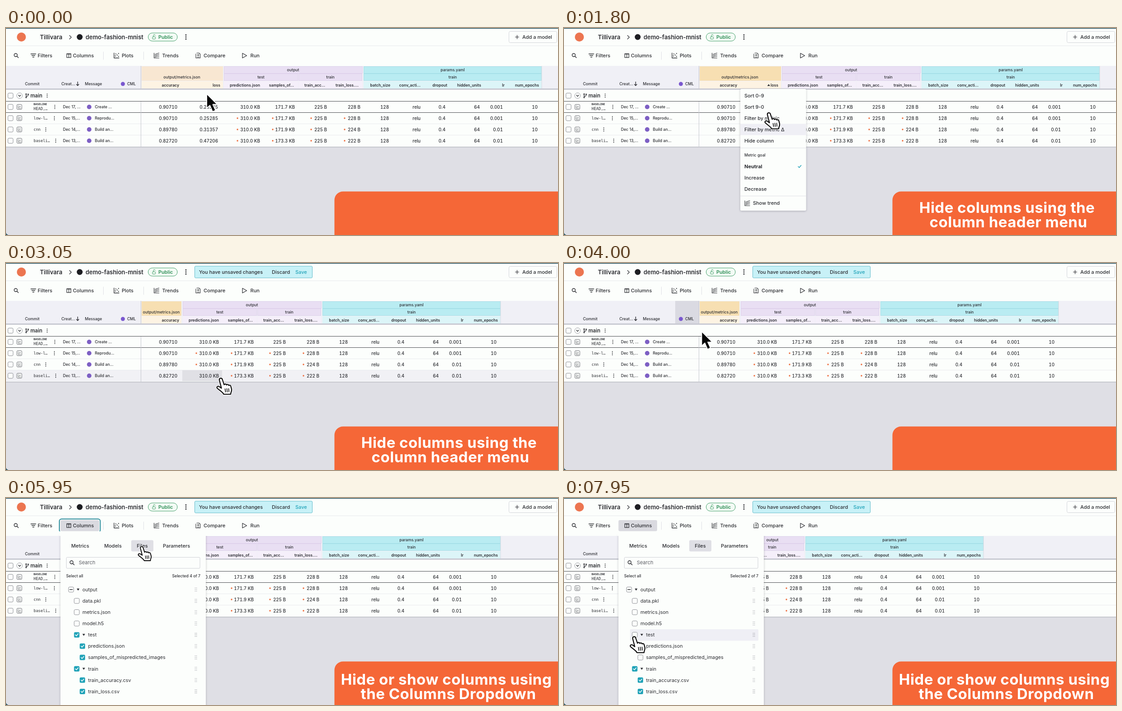
An HTML page that plays this animation: 1221 by 459 pixels, repeating every 8000 ms.

```html
<!DOCTYPE html>
<html lang="en">
<head>
<meta charset="utf-8">
<title>Hiding table columns</title>
<style>
html, body { margin: 0; width: 100%; height: 100%; overflow: hidden; background: #2b5563; }
svg { display: block; width: 100vw; height: 100vh; }
text { font-family: Inter, "Open Sans", sans-serif; white-space: pre; }
.mono { font-family: "DejaVu Sans Mono", monospace; }
.num { font-variant-numeric: tabular-nums; }
</style>
</head>
<body>
<svg id="stage" viewBox="0 0 1221 459" xmlns="http://www.w3.org/2000/svg"></svg>
<script>
const LOOP = 8000;
const INK = '#2b2c31', TEAL = '#22a3b8', WHITE = '#fcfefc', GREY = '#dfdfe5';

// ---- drawing helpers ----
const rect = (x, y, w, h, fill, extra = '') =>
  `<rect x="${x}" y="${y}" width="${w}" height="${h}" fill="${fill}" ${extra}/>`;
const circle = (x, y, r, fill, extra = '') =>
  `<circle cx="${x}" cy="${y}" r="${r}" fill="${fill}" ${extra}/>`;
const line = (d, color = INK, width = 1.2) =>
  `<path d="${d}" fill="none" stroke="${color}" stroke-width="${width}" stroke-linecap="round" stroke-linejoin="round"/>`;
const text = (x, cy, s, size = 11, o = {}) =>
  `<text x="${x}" y="${cy + size * 0.36}" font-size="${size}" font-weight="${o.w || 500}"
    text-anchor="${o.a || 'start'}" fill="${o.c || INK}" class="${o.k || ''}" ${o.x || ''}>${s}</text>`;
const group = (id, body) => `<g id="${id}">${body}</g>`;
const kebab = (x, y, r = 1, gap = 3.5) => [-gap, 0, gap].map(d => circle(x, y + d, r, INK)).join('');
const box = (x, y) =>
  rect(x - 5.7, y - 5.7, 11.4, 11.4, WHITE, 'rx="2.5" stroke="#8d8e95" stroke-width="1"');
const tick = (x, y) => rect(x - 6, y - 6, 12, 12, TEAL, 'rx="2.5"') +
  line(`M${x - 3} ${y}l2.2 2.3 4-4.6`, '#fff', 1.5);
const minus = (x, y) => box(x, y) + line(`M${x - 3} ${y}h6`, INK, 1.4);
const caret = (x, y) => `<path d="M${x - 3} ${y - 2.2}h6l-3 4.6z" fill="${INK}"/>`;
const lens = (x, y) => circle(x - 1, y - 1, 3.5, 'none', `stroke="${INK}" stroke-width="1.4"`) +
  line(`M${x + 1.8} ${y + 1.8}l3 3`, INK, 1.5);
const waves = (x, y) => line(`M${x} ${y - 5.5}v11h11M${x + 2} ${y - 2}l4-2 5-1.5M${x + 2} ${y + 1}l4-2 5-1M${x + 2} ${y + 3.5}l4-1.5 5-.5`, INK, 1.1);

// ---- top bar and toolbar ----
function topBar() {
  return circle(34, 20, 10, '#ec7550') +
    text(75, 20, 'Tillivara', 13, { w: 600 }) +
    line('M140.5 16.5l4 4-4 4') + circle(163, 20, 6.5, '#1d1e22') +
    text(176, 20, 'demo-fashion-mnist', 12.9, { w: 600 }) +
    rect(314.5, 11, 64.5, 18, '#f3fbf5', 'rx="9" stroke="#3f9d66"') +
    rect(324, 19.5, 6.5, 5, 'none', 'rx="1" stroke="#3f9d66"') +
    line('M326 19v-2a2 2 0 0 1 4-.5', '#3f9d66', 1) +
    text(337, 20, 'Public', 10.8, { w: 600, c: '#33915a' }) +
    kebab(398, 20, 1.4, 4.5) +
    rect(1112.5, 7.5, 106, 25, WHITE, 'rx="3" stroke="#d3d4da"') +
    line('M1126.5 20h8M1130.5 16v8') + text(1142, 20, 'Add a model') +
    `<path d="M0 39.5H1221" stroke="#e8e9ed"/>` +
    lens(22.5, 61) + line('M55 57.5h11M57 61h7M59 64.5h3', INK, 1.4) + text(70, 61, 'Filters');
}
function toolbar() {
  return rect(134.5, 57, 9, 8.5, 'none', `stroke="${INK}" stroke-width="1.2"`) + line('M139 57v8.5M135 58h8') +
    text(148, 61, 'Columns') +
    line('M215.5 53v17M304.5 53v17', '#dedfe5', 1) +
    line('M239 55.5v11h11', INK, 1.3) +
    [[242, 62], [243, 57.5], [246, 60], [249, 56.5], [249, 63]].map(p => circle(...p, 1.1, INK)).join('') +
    text(256, 61, 'Plots') + waves(327.5, 61) + text(345.5, 61, 'Trends') +
    line('M422 55.5h5l2.5 2.5v8.5h-9.5v-9M425 58v4M423 60h4M423 64.5h4', INK, 1.1) + text(437, 61, 'Compare') +
    line('M523 56v10.5l9.5-5.2z') + text(540.5, 61, 'Run');
}

// ---- table ----
const rowY = i => 175 + 25 * i;
// label, header right edge, value right edge, values, dot x
const COLS = {
  acc: [['accuracy', 383, 379, ['0.90710', '0.90710', '0.89780', '0.82720']]],
  loss: [['loss', 474, 469, ['0.25285', '0.25285', '0.31357', '0.47206']]],
  test: [['predictions.json', 562, 562, Array(4).fill('310.0 KB'), 512],
    ['samples_of...', 637, 639, ['171.7 KB', '171.7 KB', '171.9 KB', '173.3 KB'], 590]],
  train: [['train_acc...', 706, 710, Array(4).fill('225 B'), 675],
    ['train_loss....', 780, 784, ['228 B', '228 B', '224 B', '222 B'], 749]],
  params: [['batch_size', 850, 847, Array(4).fill('128')], ['conv_acti...', 917, 917, Array(4).fill('relu')],
    ['dropout', 976, 972, Array(4).fill('0.4')], ['hidden_units', 1051, 1048, Array(4).fill('64')],
    ['lr', 1103, 1099, ['0.001', '0.001', '0.01', '0.01']], ['num_epochs', 1179, 1176, Array(4).fill('10')]]
};
function column([label, hx, vx, vals, dot]) {
  return text(hx, 126.5, label, 8.6, { w: 600, a: 'end' }) + vals.map((v, i) =>
    text(vx, rowY(i), v, 9.8, { a: 'end', k: 'num' }) +
    (dot && i ? circle(dot, rowY(i), 1.7, '#ee6b3b', dot === 512 ? 'class="pred"' : '') : '')).join('');
}
const columns = name => COLS[name].map(column).join('');
const cell = (x, y, w, label, fill, edge) =>
  rect(x + .5, y + .5, w - 1, 15, fill, `stroke="${edge}"`) +
  text(x + w / 2, y + 8, label, 8.7, { a: 'middle' });
const LILAC = ['#e9dff3', '#dfd2ec'], AQUA = ['#b9ecf2', '#a6e0e8'];

function headers() {
  return rect(0, 84, 1221, 51, '#f0f0f6') + rect(0, 134, 1221, 3, '#c9cad3') +
    rect(246, 84, 52, 50, '#dadae2', 'id="cmlHover"') +
    rect(298, 84, 1, 50, '#c4c5cd') +
    text(42, 123.5, 'Commit', 8.7) + text(122.5, 123.5, 'Creat...', 8.7) +
    line('M158.5 119.5v8M155.8 125l2.7 2.7 2.7-2.7', INK, 1.4) +
    text(174.5, 123.5, 'Message', 8.7) + circle(258.5, 124, 4.5, '#7a58cf') + text(268, 123.5, 'CML', 8.7);
}
function rows() {
  const refs = [['HEAD,…', 108, 'Dec 17, ...', 'Create ...'], ['low-l…', 107, 'Dec 15,...', 'Reprodu...'],
    ['cnn', 88, 'Dec 14,...', 'Build an...'], ['baseli…', 110, 'Dec 13,...', 'Build an...']];
  return rect(0, 263, 1221, 2, '#c6c7ce') + rect(0, 137, 1221, 126, WHITE) +
    rect(0, 238, 1221, 24, '#f1f1f5', 'id="rowHover"') + rect(390, 238, 88, 24, '#e0e0e5', 'id="cellHover"') +
    `<path d="M0 212.5H1221M0 237.5H1221" stroke="#e9eaee"/><path d="M0 162.5H1221M0 187.5H1221" stroke="#4a4b50"/>` +
    rect(298, 163, 1, 100, '#c4c5cd') +
    box(10, 150) + circle(30, 150, 6.3, WHITE, 'stroke="#9d9ea6"') + line('M27.5 149l2.5 2.5 2.5-2.5') +
    line('M44.5 148v5M44.5 151.5c4 0 4.5-1 4.5-3', INK, 1.3) +
    [[44.5, 146.5], [44.5, 154], [49, 147]].map(p => circle(...p, 1.5, INK)).join('') +
    text(54, 150, 'main', 11.2, { w: 600 }) + kebab(91, 150) +
    text(61, 168.5, 'BASELINE', 6.2, { k: 'mono', w: 700 }) +
    refs.map(([ref, kx, date, msg], i) => {
      const y = rowY(i);
      return box(10, y) + rect(24, y - 5.5, 11, 11, WHITE, 'rx="2" stroke="#6f7077"') +
        line(`M27 ${y - 3}v6h6M29 ${y + 1}l3-3M29.5 ${y - 2}l2 2`, '#55565c', .8) +
        text(61, i ? y : 178.5, ref, 8.6, { k: 'mono' }) + kebab(kx, y) +
        text(126, y, date, 8.7) + circle(184, y, 5, '#7d5fc4') + text(196.5, y, msg, 8.7);
    }).join('');
}
function table() {
  return rect(0, 84, 1221, 375, GREY) + headers() + rows() +
    rect(300, 85, 180, 32, '#f8e7d2', 'id="metricHead"') +
    rect(300, 118, 180, 16, '#fdf3e3', 'id="metricSub"') +
    text(389, 108.5, 'output/metrics.json', 8.7, { a: 'middle', x: 'id="metricLabel"' }) +
    columns('acc') +
    group('loss', columns('loss')) + `<path id="sortMark" d="M449.5 128.5h6.500l-3.25-4z" fill="${INK}"/>` +
    rect(482.5, 85.5, 306, 15, LILAC[0], `id="outHead" stroke="${LILAC[1]}"`) +
    text(635, 93, 'output', 8.7, { a: 'middle', x: 'id="outLabel"' }) +
    group('test', rect(482, 118, 164, 16, '#f5effa') + cell(482, 101, 164, 'test', ...LILAC) + columns('test')) +
    group('train', rect(647, 118, 141, 16, '#f5effa') + cell(647, 101, 141, 'train', ...LILAC) + columns('train')) +
    group('params', rect(791, 118, 394, 16, '#dcf5f8') + cell(791, 85, 394, 'params.yaml', ...AQUA) +
      cell(791, 101, 394, 'train', ...AQUA) + columns('params') + rect(1184.5, 84, 1, 50, '#d9dae1'));
}

// ---- overlays ----
function menu() {
  const items = [['Sort 0-9', 150], ['Sort 9-0', 175], ['Filter by metric', 200], ['Filter by metric Δ', 225],
    ['Hide column', 250], ['Increase', 332], ['Decrease', 357]];
  return rect(390, 135, 145.5, 270, WHITE, 'rx="3" filter="url(#shadow)"') +
    rect(390, 213, 145.5, 25, '#efeff5', 'id="menuHover"') +
    items.map(([s, y]) => text(399, y, s, 10.9)).join('') +
    line('M390.5 266h145M390.5 372.5h145', '#e1e2e7', 1) +
    text(399, 282, 'Metric goal', 8.7) + text(399, 307, 'Neutral', 11, { w: 700 }) +
    line('M518 307l2.3 2.5 4.2-5', TEAL, 1.4) + waves(400, 388.5) + text(418, 388.5, 'Show trend', 10.9);
}
const TREE_TOP = 203, STEP = 25.1;
const treeY = i => TREE_TOP + STEP * i;
const grip = y => [-3.5, 0, 3.5].map(d => circle(418.5, y + d, .8, '#9b9ca3') + circle(421.5, y + d, .8, '#9b9ca3')).join('');
function tree(items) {
  return items.map(([s, depth, open, mark], i) => {
    const y = treeY(i), x = 144 + 12.5 * depth;
    return (mark ? mark(x, y) : '') + (open ? caret(x + 15.5, y) : '') +
      text(x + (open ? 25 : 12.5), y, s, 10.8, { w: 400 }) + grip(y);
  }).join('');
}
function panel() {
  const testBoxes = mark => mark(156.5, treeY(4)) + mark(169, treeY(5)) + mark(169, treeY(6));
  const count = s => text(430, 173, s, 8.7, { a: 'end' });
  return rect(120.5, 80, 321.5, 400, WHITE, 'filter="url(#shadow)"') + rect(118, 74, 330, 10, WHITE) +
    rect(277, 93.5, 49, 25, GREY, 'id="tabMark" rx="3"') +
    [['Metrics', 164], ['Models', 236.5], ['Files', 301.5], ['Parameters', 377]]
      .map(([s, x]) => text(x, 106, s, 11, { a: 'middle' })).join('') +
    rect(133.5, 131.5, 295.5, 24.5, WHITE, 'rx="2" stroke="#cfd0d6"') + lens(146, 143.5) +
    text(161, 143.5, 'Search', 11, { c: '#5d5e65', w: 400 }) + text(133, 173, 'Select all', 8.7) +
    rect(146, 266, 284, 25.5, '#efeff5', 'id="treeHover" rx="2"') +
    group('metricTree', tree([['output/metrics.json', 0, 1, minus], ['accuracy', 1, 0, tick], ['loss', 1, 0, box]]) +
      count('Selected 1 of 2')) +
    group('fileTree', tree([['output', 0, 1, minus], ['data.pkl', 1, 0, box], ['metrics.json', 1, 0, box],
      ['model.h5', 1, 0, box], ['test', 1, 1], ['predictions.json', 2, 0], ['samples_of_mispredicted_images', 2, 0],
      ['train', 1, 1, tick], ['train_accuracy.csv', 2, 0, tick], ['train_loss.csv', 2, 0, tick]]) +
      group('testOn', testBoxes(tick) + count('Selected 4 of 7')) +
      group('testOff', testBoxes(box) + count('Selected 2 of 7')));
}
const toast = () => rect(417.5, 7, 260, 26, '#c8f1f7', 'rx="2" stroke="#62bccb"') +
  text(427, 20, 'You have unsaved changes', 10.8) + text(588, 20, 'Discard', 11) +
  text(640, 20, 'Save', 11, { c: TEAL });
const caption = (id, y, lines) => group(id, lines.map(([s, x], i) =>
  text(x, y + i * 32, s, 33, { w: 700, a: 'middle', c: '#fff', x: 'letter-spacing=".5"' })).join(''));
const ARROW = '<path d="M0 0V32L7 25.5 13 39.5 19.5 36.5 13.5 23.5H23.5Z" fill="#060606" stroke="#fff" stroke-width="1.8" stroke-linejoin="round"/>';
const HAND_PATH = 'M-3 4C-4-1 2-2 3.5 2L7.5 14C9 11.5 12 12 12.8 14.5 14 12.5 17 13 17.8 15.5 19.5 14 22 15 22.5 18L24 24C24.5 29 22 30 22 35H6.5C5 31-2 27-8 21.5-10 18-5 16-2 19L1.5 21.5Z';
const HAND = `<path d="${HAND_PATH}" fill="#fff" stroke="#fff" stroke-width="4"/>
  <path d="${HAND_PATH}" fill="#fff" stroke="#080808" stroke-width="2.2" stroke-linejoin="round"/>` +
  line('M9.5 23l1.2 7M13.5 22.5l1 7.5M17.5 22.5l.6 7', '#080808', 1.6);

const stage = document.getElementById('stage');
stage.innerHTML = `<defs><filter id="shadow" x="-10%" y="-10%" width="120%" height="120%">
  <feDropShadow dx="0" dy="1" stdDeviation="2.2" flood-color="#30303a" flood-opacity=".3"/></filter>
  <clipPath id="window"><path d="M0 1.5H1221V459H8Q0 459 0 451Z"/></clipPath></defs>` +
  `<g clip-path="url(#window)">` + rect(0, 0, 1221, 459, WHITE) + topBar() + group('toast', toast()) + table() +
  rect(118, 46.5, 90.5, 29.5, WHITE, `id="focusRing" rx="5" stroke="#2b8c9b" stroke-width="2"`) +
  rect(120.5, 49, 85.5, 24.5, GREY, 'id="colButton" rx="3"') +
  toolbar() + group('menu', menu()) + group('panel', panel()) + '</g>' +
  rect(726.5, 362.5, 520, 130, '#f56737', 'rx="19"') +
  caption('caption1', 398.5, [['Hide columns using the', 980], ['column header menu', 983]]) +
  caption('caption2', 402.5, [['Hide or show columns using', 974], ['the Columns Dropdown', 978.5]]) +
  group('arrow', ARROW) + group('hand', HAND);

// ---- motion ----
const el = {};
stage.querySelectorAll('[id]').forEach(n => el[n.id] = n);
const predDots = stage.querySelectorAll('.pred');
const set = (id, attrs) => { for (const k in attrs) el[id].setAttribute(k, attrs[k]); };
const show = (id, on) => set(id, { visibility: on ? 'inherit' : 'hidden' });
const clamp = v => Math.min(1, Math.max(0, v));
const ramp = (t, a, b) => clamp((t - a) / (b - a));
const ease = u => u < .5 ? 4 * u ** 3 : 1 - 4 * (1 - u) ** 3;
const between = (v, a, b) => v >= a && v < b;

// start, end, x, y, bend x, bend y
const MOVES = [[100, 500, 464, 128, 0, 0], [1505, 2105, 468, 254, -13, 0], [2750, 3000, 475, 256, 0, 0],
  [3450, 4470, 196, 70, 0, 10], [5150, 5600, 300, 108, 0, 0], [6430, 7030, 155, 308, -19, -21]];
const HANDS = [[380, 3500], [4330, 5230], [5450, 6560], [6990, LOOP]];
const CLICKS = [980, 2680, 4950, 5930, 7630];
const LEAD = 80; // the pointer is smoothed and trails the hover state

function pointer(t) {
  let x = 444, y = 146;
  for (const [a, b, nx, ny, bx, by] of MOVES) {
    if (t < a) break;
    const e = ease(ramp(t, a, b)), bow = 4 * e * (1 - e);
    x += (nx - x) * e + bx * bow;
    y += (ny - y) * e + by * bow;
  }
  return { x, y };
}
// the pointer dips in size around each click
const pressScale = t => 1 - .14 * Math.max(...CLICKS.map(c => clamp(1 - Math.abs(t - c) / 130)));

function render(t) {
  const p = pointer(t), h = pointer(Math.min(t + LEAD, LOOP));
  const menuOpen = between(t, 1000, 2700), lossHidden = t >= 2700;
  const panelOpen = t >= 5075, files = t >= 5950, testHidden = t >= 7650;

  // table columns
  const shift = lossHidden ? -91 : 0, shift2 = shift - (testHidden ? 166 : 0);
  show('loss', !lossHidden);
  show('sortMark', menuOpen);
  show('test', !testHidden);
  set('test', { transform: `translate(${shift})` });
  set('train', { transform: `translate(${shift2})` });
  set('params', { transform: `translate(${shift2})` });
  const metricW = lossHidden ? 88 : 180;
  set('metricHead', { width: metricW, fill: t >= 950 ? '#f7dfb2' : '#f8e7d2' });
  set('metricSub', { width: metricW });
  set('metricLabel', { x: lossHidden ? 343.5 : 389 });
  const outW = testHidden ? 140 : 306;
  set('outHead', { x: 482.5 + shift, width: outW });
  set('outLabel', { x: 482 + shift + outW / 2 });

  // hover states
  const row = Math.floor((h.y - 163) / 25);
  const rowOn = between(t, 2700, 4300) && row >= 0 && row < 4;
  const onPred = rowOn && h.x > 389;
  show('rowHover', rowOn);
  show('cellHover', rowOn);
  if (rowOn) {
    set('rowHover', { y: 163 + row * 25 });
    set('cellHover', { y: 163 + row * 25, x: onPred ? 390 : 300 });
  }
  predDots.forEach((d, i) => d.setAttribute('visibility', onPred && row === i + 1 ? 'hidden' : 'inherit'));
  show('cmlHover', between(h.x, 246, 298) && between(h.y, 84, 134));
  const item = Math.floor((h.y - 137.5) / 25);
  show('menu', menuOpen);
  show('menuHover', menuOpen && item >= 0 && item < 5);
  set('menuHover', { y: 137.5 + Math.max(0, item) * 25 });

  show('toast', t >= 2750);

  // columns button and dropdown
  show('colButton', t >= 4300);
  set('colButton', { fill: panelOpen ? '#dadae0' : '#eaeaf0' });
  show('focusRing', between(t, 4850, 7650));
  show('panel', panelOpen);
  set('tabMark', { x: files ? 277 : 138, width: files ? 49 : 53 });
  show('metricTree', !files);
  show('fileTree', files);
  show('testOn', !testHidden);
  show('testOff', testHidden);
  const leaf = Math.floor((h.y - TREE_TOP + STEP / 2) / STEP);
  show('treeHover', files && leaf >= 0);
  set('treeHover', { y: treeY(Math.max(0, leaf)) - 12.5 });

  // captions
  set('caption1', { opacity: ramp(t, 300, 600) * (1 - ramp(t, 3500, 3750)) });
  set('caption2', { opacity: ramp(t, 4300, 4600) });

  const hand = HANDS.some(([a, b]) => between(t, a, b));
  show('hand', hand);
  show('arrow', !hand);
  set(hand ? 'hand' : 'arrow',
    { transform: `translate(${p.x.toFixed(2)} ${p.y.toFixed(2)}) scale(${pressScale(t).toFixed(3)})` });
}

const start = performance.now();
function loop() {
  render((performance.now() - start) % LOOP);
  requestAnimationFrame(loop);
}
render(0);
requestAnimationFrame(loop);
</script>
</body>
</html>
```
